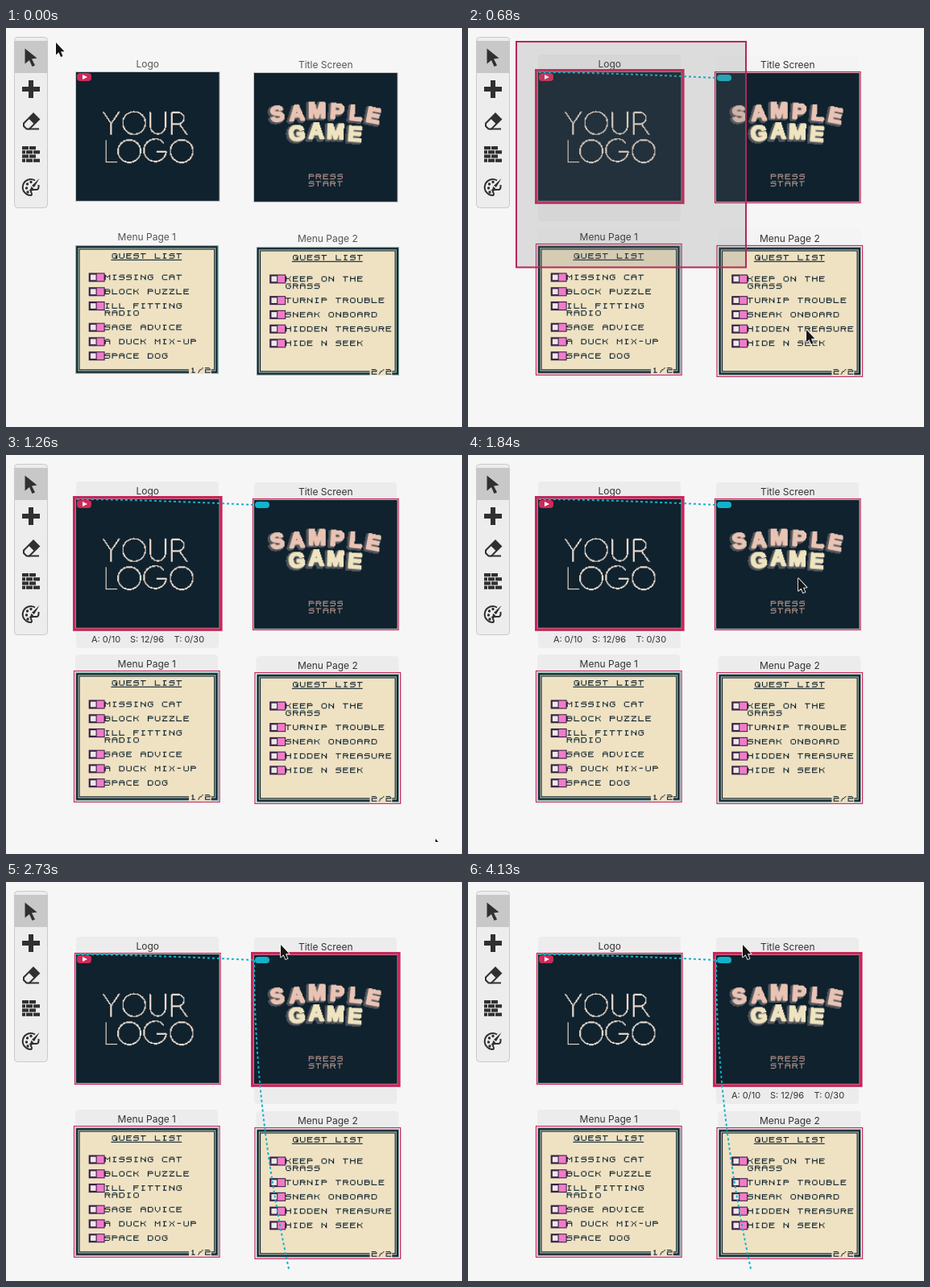
Write an HTML page with a canvas that moves like this. It is 566x496 px and loops after 4.2 s.

```html
<!DOCTYPE html>
<html>
<head>
<meta charset="utf-8">
<style>
html, body { margin: 0; width: 566px; height: 496px; overflow: hidden; background: #f6f6f6; }
canvas { display: block; }
</style>
</head>
<body>
<canvas id="stage" width="566" height="496"></canvas>
<script>
const ctx = document.getElementById('stage').getContext('2d');
const SCALE = 1.11, W = 160 * SCALE, H = 144 * SCALE;
const INK = '#10242f', CREAM = '#efe2c3', RED = '#c4285a', TEAL = '#14b1cb';

// Segment lettering: each segment is x0 y0 x1 y1 on a 6 x 6 grid; r s t u are the corners.
const SEGMENTS = {
  a: '1040', b: '5152', c: '5254', d: '1545', e: '0204', f: '0102', g: '1242',
  h: '0022', i: '2022', j: '5032', k: '3255', l: '2205', m: '2225', n: '1111',
  p: '3252', q: '0232', r: '0000', s: '5050', t: '0505', u: '5555', v: '0325', w: '5335'
};
const GLYPHS = {
  A: 'abcefgtu', B: 'abcdefgrt', C: 'adefsu', D: 'abcdefrt', E: 'adefgrstu', F: 'aefgrst',
  G: 'acdefps', H: 'bcefgrstu', I: 'aimd', K: 'efqjkrt', L: 'defrtu', M: 'bcefhjrstu',
  N: 'bcefhkrstu', O: 'abcdef', P: 'abefgrt', Q: 'abcdefk', R: 'abefgkrt', S: 'acdfgst',
  T: 'aimrs', U: 'bcdefrs', V: 'bfvwrs', X: 'hjkl', Z: 'ajldrstu',
  1: 'imdn', 2: 'abgedrtu', '/': 'jl', '-': 'g'
};

function pixelText(g, text, x, y, color) {
  g.fillStyle = color;
  [...text].forEach((ch, col) => {
    for (const s of GLYPHS[ch] || '') {
      const [x0, y0, x1, y1] = [...SEGMENTS[s]].map(Number);
      const steps = Math.max(Math.abs(x1 - x0), Math.abs(y1 - y0), 1);
      for (let i = 0; i <= steps; i++)
        g.fillRect(x + 1 + col * 8 + Math.round(x0 + (x1 - x0) * i / steps),
                   y + 1 + Math.round(y0 + (y1 - y0) * i / steps), 1, 1);
    }
  });
}

function lowRes(draw) {
  const c = document.createElement('canvas');
  c.width = 160;
  c.height = 144;
  draw(c.getContext('2d', { willReadFrequently: true }));
  return c;
}

// Draws smooth shapes in stage units, then hardens their edges over a dark back.
function darkScreen(g, x, y, draw) {
  g.scale(1 / SCALE, 1 / SCALE);
  g.translate(-x, -y);
  draw();
  g.resetTransform();
  const img = g.getImageData(0, 0, 160, 144);
  for (let i = 3; i < img.data.length; i += 4) img.data[i] = img.data[i] > 115 ? 255 : 0;
  g.putImageData(img, 0, 0);
  g.globalCompositeOperation = 'destination-over';
  g.fillStyle = '#0f222e';
  g.fillRect(0, 0, 160, 144);
  g.globalCompositeOperation = 'source-over';
}

const ring = (x, y, r) => `M${x - r} ${y}a${r} ${r} 0 1 0 ${2 * r} 0a${r} ${r} 0 1 0 ${-2 * r} 0`;

const logoArt = lowRes(g => darkScreen(g, 87, 55, () => {
  g.strokeStyle = '#ecdacd';
  g.lineWidth = 1.6;
  g.stroke(new Path2D(
    'M120.5 104L130.5 119V133M140.5 104L130.5 119' + ring(159, 118, 14) +
    'M179 104V122a9.5 9.5 0 0 0 19 0V104' +
    'M206 133V105h8a7 7 0 0 1 0 14h-8M215 119L225 133' +
    'M124 139V166.5H138' + ring(153, 153, 14) +
    'M196 143A14 14 0 1 0 199 154H187' + ring(218, 153, 14)));
}));

const titleArt = lowRes(g => {
  darkScreen(g, 308, 56, () => {
    g.font = 'bold 26px "Liberation Sans", Arial, sans-serif';
    g.textAlign = 'center';
    g.lineJoin = 'round';
    const word = (color, letters) => {
      for (const shadow of [true, false])
        for (const [ch, x, y, turn] of letters) {
          g.save();
          g.translate(x - (shadow ? 2 : 0), y + (shadow ? 1.5 : 0));
          g.rotate(turn);
          g.fillStyle = g.strokeStyle = shadow ? '#50545a' : color;
          g.lineWidth = shadow ? 5 : 2.6;
          g.strokeText(ch, 0, 7.5);
          g.fillText(ch, 0, 7.5);
          g.restore();
        }
    };
    word('#e9c3b4', [['S', 337, 108, -.14], ['A', 361, 107, -.06], ['M', 386, 104, 0],
      ['P', 411, 105, .06], ['L', 434, 107, .1], ['E', 456, 110, .2]]);
    word('#efe4c1', [['G', 361, 132, -.05], ['A', 385, 130, 0], ['M', 409, 130, .03], ['E', 433, 133, .08]]);
  });
  pixelText(g, 'PRESS', 60, 112, '#b8948c');
  pixelText(g, 'START', 60, 120, '#b8948c');
});

function menuArt(page, rows) {
  return lowRes(g => {
    ['#8fb5ae', INK, INK, '#b9c4b4', INK, CREAM].forEach((color, i) => {
      g.fillStyle = color;
      g.fillRect(i, i, 160 - 2 * i, 144 - 2 * i);
    });
    pixelText(g, 'QUEST LIST', 40, 8, INK);
    g.fillRect(40, 16, 79, 1);
    for (const [row, text, plain] of rows) {
      const y = row * 8;
      pixelText(g, text, 32, y, INK);
      if (plain) continue;
      g.fillStyle = '#3c2148';
      g.fillRect(15, y - 1, 18, 10);
      g.fillStyle = '#f07cc9';
      g.fillRect(24, y, 8, 8);
      g.fillStyle = '#ece9e6';
      g.fillRect(17, y + 1, 6, 6);
    }
    g.fillStyle = CREAM;
    g.fillRect(127, 136, 25, 8);
    pixelText(g, page, 128, 136, INK);
  });
}

const cards = [
  { name: 'Logo', x: 87, y: 55, from: 6, art: logoArt, dark: true },
  { name: 'Title Screen', x: 308, y: 56, from: 8, art: titleArt, dark: true },
  { name: 'Menu Page 1', x: 86, y: 270, from: 8, art: menuArt('1/2', [
    [4, 'MISSING CAT'], [6, 'BLOCK PUZZLE'], [8, 'ILL FITTING'], [9, 'RADIO', true],
    [11, 'SAGE ADVICE'], [13, 'A DUCK MIX-UP'], [15, 'SPACE DOG']]) },
  { name: 'Menu Page 2', x: 310.5, y: 272, from: 8, art: menuArt('2/2', [
    [4, 'KEEP ON THE'], [5, 'GRASS', true], [7, 'TURNIP TROUBLE'], [9, 'SNEAK ONBOARD'],
    [11, 'HIDDEN TREASURE'], [13, 'HIDE N SEEK']]) }
];

// Keys are [step, x, y]; the marquee corner trails the pointer by one step.
const MARQUEE = [[3, 62, 18], [4, 76, 30], [5, 130, 85], [6, 199, 152], [7, 270, 220],
  [9, 420, 375], [10, 500, 450], [11, 523, 472], [12, 533, 477]];
const RETURN = [[16, 533, 477], [19, 480, 330], [21, 430, 190], [24, 370, 80], [27, 344, 42],
  [29, 344, 42], [30, 343, 46], [32, 342, 71], [33, 341, 78]];
const DRAG = [[29, 0], [30, 4], [32, 28], [33, 35]];
const CLICK = 28;

function at(keys, n) {
  if (n <= keys[0][0]) return keys[0].slice(1);
  for (let i = 1; i < keys.length; i++) {
    const [t0, ...p] = keys[i - 1], [t1, ...q] = keys[i];
    if (n <= t1) return p.map((v, j) => v + (q[j] - v) * (n - t0) / (t1 - t0));
  }
  return keys[keys.length - 1].slice(1);
}

function box(x, y, w, h, r, fill, stroke) {
  ctx.beginPath();
  ctx.roundRect(x, y, w, h, r);
  if (fill) { ctx.fillStyle = fill; ctx.fill(); }
  if (stroke) { ctx.strokeStyle = stroke; ctx.lineWidth = 1; ctx.stroke(); }
}

function shape(d, fill, stroke, width) {
  const p = new Path2D(d);
  if (stroke) { ctx.strokeStyle = stroke; ctx.lineWidth = width; ctx.stroke(p); }
  if (fill) { ctx.fillStyle = fill; ctx.fill(p); }
}

function toolbar() {
  const c = '#303030';
  box(10.5, 11.5, 41, 212, 4, '#ededed', '#c9c9c9');
  ctx.fillStyle = '#c8c8c8';
  ctx.fillRect(11, 16, 40, 40);
  shape('M23.5 25.5L38.5 37.5L32 38.5L36 46.5L32.5 48L29 40L23.5 44.5Z', c);
  shape('M28 65h6v8h8v6h-8v8h-6v-8h-8v-6h8z', c);
  shape('M22 118.5L34 106.5L41 113.5L29 125.5H25.5L22 122Z', null, c, 2);
  shape('M28 112.5L34 106.5L41 113.5L35 119.5Z', c);
  shape('M29 124.5H41V126.5H27Z', c);
  for (let r = 0; r < 4; r++)
    for (const [x, w] of r % 2 ? [[20, 4], [25, 8], [34, 8]] : [[20, 8], [29, 8]]) {
      ctx.fillStyle = c;
      ctx.fillRect(x, 147 + r * 5.2, w, 4.2);
    }
  shape('M36 189.5A10 10 0 1 0 31 208q2-1 0-4q-1-3 3-3h4q3 0 2.5-6', null, c, 2);
  shape(ring(25.5, 199, 1.7) + ring(26.5, 194, 1.7) + ring(31, 191.5, 1.7) + ring(27, 204, 1.7), c);
  shape('M41.5 187L35 198L32 196Z', c);
  shape('M34 199q-1 4-6 3q3-1 3-5z', c);
}

function drawCard(card, n, active, since) {
  const { name, x, y } = card, chosen = n >= card.from;
  if (chosen) {
    ctx.globalAlpha = Math.min(1, (n - card.from + 1) / 4);
    box(x, y - 22, 177, 19, [4, 4, 0, 0], '#ececec');
    if (active) box(x, y + 165, 177, 20, [0, 0, 4, 4], '#ececec');
    ctx.globalAlpha = 1;
  }
  ctx.fillStyle = chosen ? '#333' : '#555';
  ctx.font = '12px Inter, "Open Sans", sans-serif';
  ctx.textAlign = 'center';
  ctx.fillText(name, x + W / 2, y - 6);
  ctx.drawImage(card.art, x, y, W, H);
  if (card.dark) {
    ctx.strokeStyle = '#c9c0c2';
    ctx.lineWidth = 1;
    ctx.strokeRect(x - .5, y - .5, W + 1, H + 1);
  }
  if (!chosen) return;
  const width = !active ? 1.2 : n === since ? 7 : 3.5;
  const grow = active ? .5 + width / 2 : 1.5;
  ctx.globalAlpha = width === 7 ? .8 : 1;
  ctx.strokeStyle = RED;
  ctx.lineWidth = width;
  ctx.strokeRect(x - grow, y - grow, W + 2 * grow, H + 2 * grow);
  ctx.globalAlpha = 1;
  if (active && n >= since + (since === CLICK ? 8 : 4)) {
    ctx.font = '11px Inter, "Open Sans", sans-serif';
    ctx.textAlign = 'left';
    ctx.fillStyle = '#333';
    [['A: 0/10', 19], ['S: 12/96', 67], ['T: 0/30', 121.5]]
      .forEach(([text, dx]) => ctx.fillText(text, x + dx, y + 178));
  }
}

function links(n, drag) {
  const k = drag / 35;
  ctx.setLineDash([3, 3]);
  shape(`M88 ${55 + drag}c62 0 152 4 221 7`, null, TEAL, 2);
  if (n >= CLICK)
    shape(`M308 ${62 + drag}C308 ${200 + 20 * k} 322 ${330 + 15 * k} ${353 - 2 * k} 481`, null, TEAL, 2);
  ctx.setLineDash([]);
  box(309, 58 + drag, 18, 8, 4, TEAL);
}

function render(n) {
  ctx.fillStyle = '#f6f6f6';
  ctx.fillRect(0, 0, 566, 496);
  ctx.save();
  ctx.beginPath();
  ctx.rect(0, 0, 538, 481);
  ctx.clip();

  const [drag] = at(DRAG, n);
  const current = n >= CLICK ? 1 : 0;
  ctx.save();
  ctx.translate(0, drag);
  cards.forEach((card, i) => drawCard(card, n, i === current, current ? CLICK : 6));
  box(88, 56, 18, 10, 4, '#cf2a58');
  shape('M95 58L101 61L95 64Z', '#fff');
  ctx.restore();
  if (n >= 6) links(n, drag);

  if (n > 3 && n < 14) {
    const [mx, my] = at(MARQUEE, Math.min(n, 11));
    ctx.fillStyle = 'rgba(113,113,113,.195)';
    ctx.fillRect(60, 17, mx - 60, my - 17);
    ctx.strokeStyle = '#b3285c';
    ctx.lineWidth = 2;
    ctx.strokeRect(60, 17, mx - 60, my - 17);
  }
  toolbar();

  const [cx, cy] = n < 16 ? at(MARQUEE, n + 1) : at(RETURN, n);
  ctx.translate(cx, cy);
  ctx.lineJoin = 'round';
  shape('M0 0V15.5L3.5 12.3L6 18L8.5 17L6 11.3H10.5Z', '#151515', '#fff', 1.6);
  ctx.restore();
}

function tick(now) {
  const t = now % 4200;
  render(t < 30 ? -1 : Math.min(50, Math.floor((t - 30) / 82 + .25)));
  requestAnimationFrame(tick);
}
requestAnimationFrame(tick);
</script>
</body>
</html>
```
